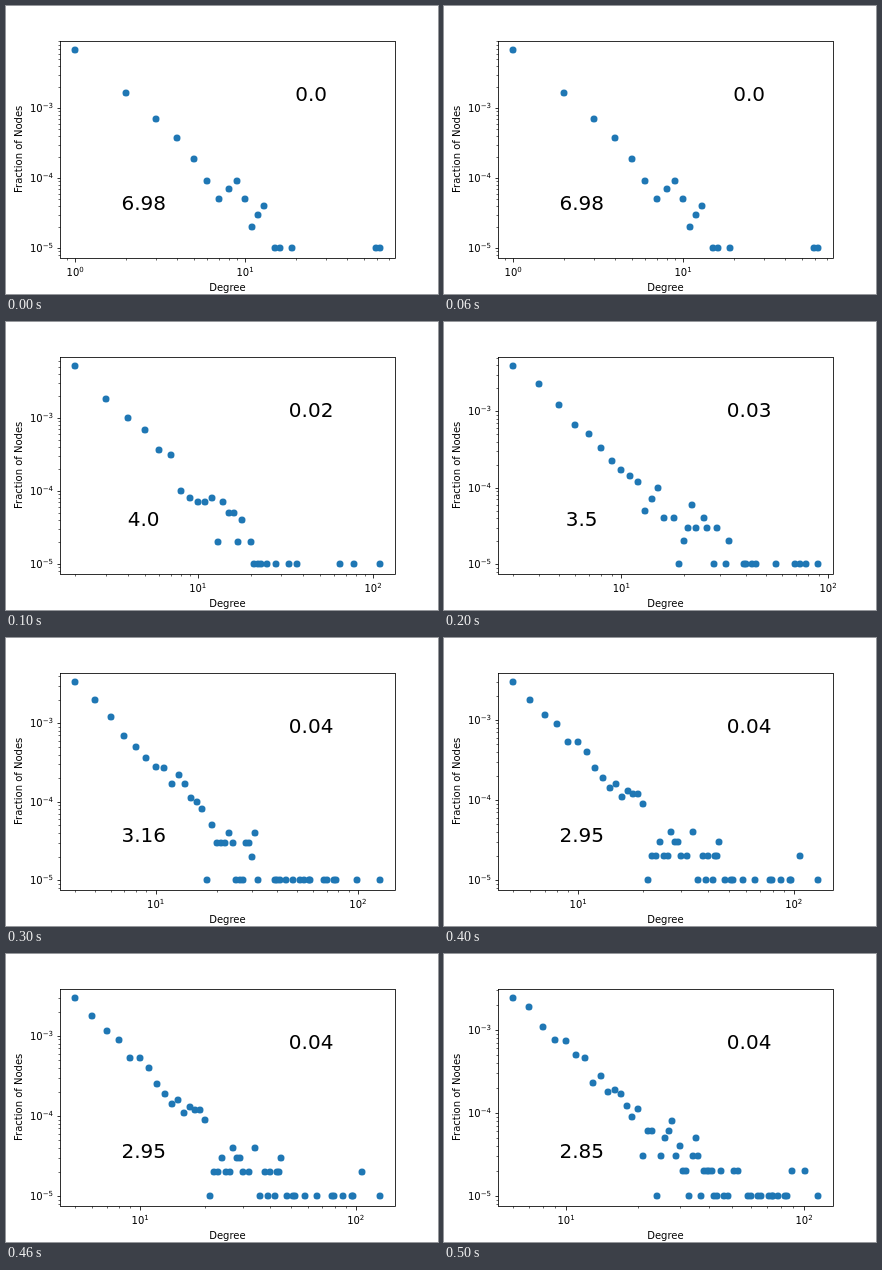
Recreate the animation shown at these times as an HTML page. Size 432 by 288 pixels, loop 0.6 s.

```html
<!DOCTYPE html>
<html lang="en">
<head>
<meta charset="utf-8">
<title>Degree distribution</title>
<style>
  html, body { margin: 0; width: 100%; height: 100%; overflow: hidden; background: #fff; }
  svg { display: block; width: 432px; height: 288px; }
  text { font: 10px "DejaVu Sans", sans-serif; text-anchor: middle; }
  .y { text-anchor: end; }
  .sup { font-size: 7px; }
  .big { font-size: 20px; }
  .dots { fill: #1f77b4; }
  path, rect { fill: none; stroke: #000; stroke-width: .8; }
  .minor { stroke-width: .6; }
</style>
</head>
<body>
<svg viewBox="0 0 432 288">
  <g id="plot"></g>
  <rect x="54.5" y="35.5" width="335" height="217"/>
  <text x="221.4" y="285">Degree</text>
  <text transform="translate(16 143.3) rotate(-90)">Fraction of Nodes</text>
</svg>
<script>
const LEFT = 54, RIGHT = 388.8, TOP = 34.56, BOTTOM = 252;
const STEP = 100;
const { log10, round, floor } = Math;

// Log axis from lo to hi with a 5% margin at both ends.
function logScale(lo, hi, start, end) {
  const pad = (end - start) / 22;
  const decade = (end - start - 2 * pad) / log10(hi / lo);
  return v => start + pad + decade * log10(v / lo);
}

const power = (e, x, y, cls = "") =>
  `<text class="${cls}" x="${x}" y="${y}">10<tspan class="sup" dy="-4">${String(e).replace("-", "\u2212")}</tspan></text>`;

function ticks(scale, start, end, draw) {
  let out = "";
  for (let e = -1; e <= 3; e++)
    for (let m = 1; m <= 9; m++) {
      const p = scale(m * 10 ** e);
      if (p >= Math.min(start, end) && p <= Math.max(start, end)) out += draw(p, e, m === 1);
    }
  return out;
}

const xTick = (p, e, major) =>
  `<path class="${major ? "" : "minor"}" d="M${round(p) + .5} 252.5v${major ? 4 : 2}"/>` +
  (major ? power(e, p, 270) : "");

const yTick = (p, e, major) =>
  `<path class="${major ? "" : "minor"}" d="M54.5 ${round(p) + .5}h${major ? -3 : -2}"/>` +
  (major ? power(e - 5, 47, round(p) + 4, "y") : "");

// counts: nodes (per 100,000) for consecutive degrees starting at min;
// twos and ones: the sparse tail, degrees with that many nodes.
function chart(min, slope, score, counts, twos, ones) {
  const points = [
    ...counts.map((n, i) => [min + i, n]).filter(p => p[1]),
    ...twos.map(d => [d, 2]),
    ...ones.map(d => [d, 1])
  ];
  const x = logScale(min, Math.max(...points.map(p => p[0])), LEFT, RIGHT);
  const y = logScale(1, counts[0], BOTTOM, TOP);
  const dots = points.map(([d, n]) => `<circle cx="${round(x(d))}" cy="${round(y(n))}" r="3.5"/>`);
  return ticks(x, LEFT, RIGHT, xTick) + ticks(y, BOTTOM, TOP, yTick) +
    `<g class="dots">${dots.join("")}</g>` +
    `<text class="big" x="305.1" y="95">${score}</text>` +
    `<text class="big" x="137.7" y="204">${slope}</text>`;
}

const charts = [
  chart(1, "6.98", "0.0",
    [667, 164, 70, 37, 19, 9, 5, 7, 9, 5, 2, 3, 4],
    [], [15, 16, 19, 59, 62]),
  chart(2, "4.0", "0.02",
    [510, 183, 100, 69, 37, 31, 10, 8, 7, 7, 8, 2, 7, 5, 5, 2, 4],
    [20], [21, 22, 23, 25, 28, 33, 37, 65, 78, 109]),
  chart(3, "3.5", "0.03",
    [384, 226, 120, 66, 50, 33, 22, 17, 14, 12, 5, 7, 10, 4, 0, 4, 1, 2, 3, 6, 3, 0, 4, 3, 0, 1, 3],
    [33], [32, 39, 40, 43, 45, 56, 69, 73, 78, 89]),
  chart(4, "3.16", "0.04",
    [332, 198, 120, 69, 50, 36, 28, 27, 17, 22, 17, 11, 10, 8, 1, 5, 3, 3, 3, 4, 3, 1, 1, 1, 3, 3, 2, 4],
    [], [32, 39, 40, 41, 44, 48, 52, 54, 57, 58, 68, 70, 76, 78, 99, 128]),
  chart(5, "2.95", "0.04",
    [292, 176, 115, 88, 53, 53, 40, 25, 19, 14, 16, 11, 13, 12, 12, 9, 1, 2, 2, 3, 2, 2, 4, 3, 3, 2, 0, 2, 0, 4,
      0, 1, 0, 2, 1, 2, 0, 1, 2, 2, 3],
    [107], [48, 51, 52, 58, 66, 78, 79, 87, 96, 97, 129]),
  chart(6, "2.85", "0.04",
    [238, 188, 108, 75, 73, 50, 46, 23, 28, 18, 19, 17, 12, 9, 11, 3, 6, 6, 1, 3, 5, 6, 8, 3, 4, 2, 2, 1, 3, 5, 3, 1],
    [38, 39, 40, 41, 45, 51, 53, 89, 101],
    [42, 43, 46, 48, 58, 60, 64, 66, 71, 73, 74, 78, 83, 85, 114])
];

const plot = document.getElementById("plot");
let shown = -1;

function show(time) {
  const i = floor(time / STEP) % charts.length;
  if (i !== shown) plot.innerHTML = charts[shown = i];
}

const start = performance.now();
function tick() {
  show(performance.now() - start);
  requestAnimationFrame(tick);
}
tick();
</script>
</body>
</html>
```
